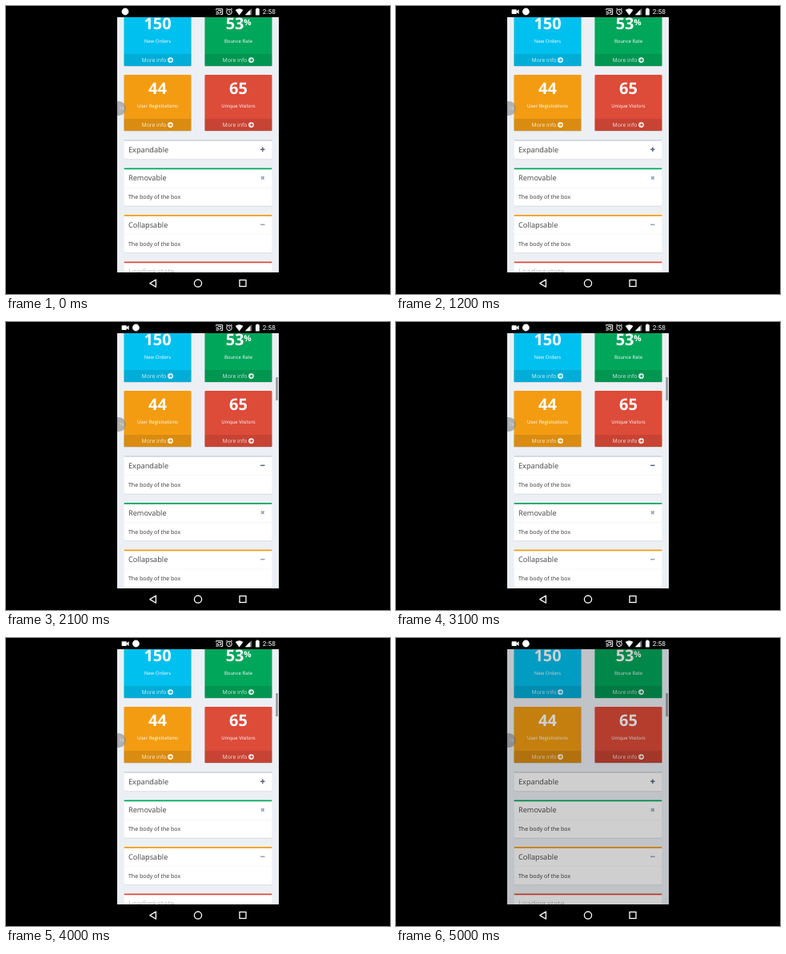
Recreate the animation shown at these times as an HTML page. Size 480 by 360 pixels, loop 5100 ms.

```html
<!DOCTYPE html>
<html lang="en">
<head>
<meta charset="utf-8">
<title>Dashboard boxes</title>
<style>
  html, body { margin: 0; width: 100%; height: 100%; overflow: hidden; background: #000; }
  svg { display: block; width: 480px; height: 360px; }
  text { font-family: "Open Sans", "Noto Sans", sans-serif; text-rendering: geometricPrecision; }
  .mid { text-anchor: middle; }
  .num { font-size: 20px; font-weight: 700; fill: #fff; }
  .sup { font-size: 10.4px; font-weight: 700; fill: #fff; }
  .label { font-size: 6px; fill: #fff; }
  .more { font-size: 6.85px; fill: #fff; fill-opacity: .82; }
  .title { font-size: 9.2px; fill: #444; }
  .body { font-size: 7px; fill: #333; }
  .clock { font: 8.3px Roboto, sans-serif; fill: #fff; }
</style>
</head>
<body>
<svg viewBox="0 0 480 360">
  <defs>
    <clipPath id="screen"><rect x="139" y="14" width="202" height="319"/></clipPath>
    <clipPath id="fold"><rect id="foldRect" x="147" y="167" width="186" height="24"/></clipPath>
  </defs>
  <rect width="480" height="360"/>

  <g clip-path="url(#screen)">
    <rect x="139" y="14" width="202" height="319" fill="#ecf0f5"/>
    <g id="cards"></g>
    <g id="first"></g>
    <g id="rest"></g>
    <rect id="scroll" x="337.4" y="69" width="2.4" height="29" fill="#8d9094"/>
    <circle cx="141" cy="128" r="9" fill="#8b8b8b" fill-opacity=".62"/>
    <text x="141.3" y="130.2" font-size="5.8" fill="#ddd">74</text>
    <rect id="dim" x="139" y="14" width="202" height="319"/>
  </g>

  <g fill="#fff">
    <g id="camera">
      <rect x="144.6" y="4.2" width="6.2" height="5.8" rx=".8"/>
      <path d="M150.6 6.5l3-2.2v5.6l-3-2.2z"/>
    </g>
    <circle id="chat" cy="7" r="4.4"/>
    <g fill="none" stroke="#fff">
      <path d="M262.7 5.2V3.7h8v6.8h-2.6M262.6 10.6h1M262.6 8.7a2 2 0 0 1 2 2M262.6 6.8a3.8 3.8 0 0 1 3.8 3.8"/>
      <path d="M265 5.6h3.8v3h-1.6"/>
      <circle cx="279" cy="7.3" r="3.3"/>
      <path d="M279 5.2v2.3l1.5.9M275.1 4.3l1.9-1.5M282.9 4.3l-1.9-1.5" stroke-width=".9"/>
    </g>
    <path d="M286.7 5.1q4.9-3.9 9.8 0L291.600 11.400z"/>
    <path d="M307.300 2.700v8.500h-8.500z" fill-opacity=".4"/>
    <path d="M305.400 4.600v6.600h-6.600z"/>
    <path d="M312 3.400h1.200v-.9h2.400v.9h1.200v8H312z"/>
    <text class="clock" x="320.800" y="10.200">2:58</text>
  </g>

  <g fill="none" stroke="#fff" stroke-width="1.3">
    <path d="M187.400 342v9.200l-7.600-4.600z" stroke-linejoin="round"/>
    <circle cx="240" cy="346.600" r="4.600"/>
    <rect x="292" y="342.500" width="8" height="8"/>
  </g>
</svg>

<script>
const LOOP = 5100, TOP = 167.1, HEAD = 24.2, BODY = 23.4, GAP = 11.3;
const $ = id => document.getElementById(id);

const rect = (x, y, w, h, fill, extra = "") =>
  `<rect x="${x}" y="${y}" width="${w}" height="${h}" fill="${fill}" ${extra}/>`;
const text = (cls, x, y, s, extra = "") =>
  `<text class="${cls}" x="${x}" y="${y}" ${extra}>${s}</text>`;

function card(x, y, color, num, label, sup) {
  const mid = x + 42, cy = y + 62.6;
  return rect(x, y + 1, 84, 69.9, "#000", 'rx="1" fill-opacity=".1"') +
    rect(x, y, 84, 70, color, 'rx="1"') +
    rect(x, y + 55, 84, 15, "#000", 'fill-opacity=".1"') +
    (sup ? text("num", x + 26.2, y + 24.3, num) + text("sup", x + 48.8, y + 18.6, sup)
         : text("num mid", mid, y + 24.3, num)) +
    text("label mid", mid, y + 41.2, label) +
    text("more", x + 22, y + 65.1, "More info") +
    `<circle cx="${x + 58}" cy="${cy}" r="3.4" fill="#fff" fill-opacity=".95"/>
     <path d="M${x + 56} ${cy}h3.6m-1.7-1.8l1.8 1.8l-1.8 1.8" fill="none" stroke="${color}" stroke-width="1.1"/>`;
}

const frame = (y, h, color) =>
  rect(147.5, y + 1, 185, h, "#000", 'rx="1.5" fill-opacity=".08"') +
  rect(147.5, y, 185, h, "#fff", 'rx="1.5"') +
  rect(147.5, y, 185, 1.7, color, 'rx=".8"');

const divider = y => rect(147.5, y, 185, .6, "#f1f1f1");

function icon(kind, y, color) {
  const shape = { plus: "M-2.7 0H2.7M0-2.7V2.7", minus: "M-2.7 0H2.7", cross: "M-1.8-1.8L1.8 1.8M-1.8 1.8L1.8-1.8" };
  return `<path d="${shape[kind]}" transform="translate(320.8 ${y})" stroke="${color}" stroke-width="1.5"/>`;
}

function box(y, color, title, kind) {
  return frame(y, HEAD + BODY - .4, color) + divider(y + HEAD) +
    text("title", 153, y + 15.6, title) + icon(kind, y + 12.2, "#97a0b3") +
    text("body", 153, y + 38.6, "The body of the box");
}

$("cards").innerHTML =
  card(147.5, 5, "#00c0ef", "150", "New Orders") +
  card(248.5, 5, "#00a65a", "53", "Bounce Rate", "%") +
  card(147.5, 86, "#f39c12", "44", "User Registrations") +
  card(248.5, 86, "#dd4b39", "65", "Unique Visitors");

const second = TOP + HEAD + GAP, pitch = 58.5;
$("rest").innerHTML =
  box(second, "#00a65a", "Removable", "cross") +
  box(second + pitch, "#f39c12", "Collapsable", "minus") +
  frame(second + 2 * pitch, 47, "#dd4b39") +
  text("title", 153, second + 2 * pitch + 15.6, "Loading state", 'fill-opacity=".36"');

// [start ms, value]: each value holds until the next start
const slide = [[0, 0], [1800, .345], [1900, .655], [2000, .905], [2100, 1],
  [3400, .99], [3700, .39], [3900, .01], [4000, 0]];
const shade = [[0, 0], [4900, .03], [5000, .19]];
const at = (steps, t) => steps.filter(s => s[0] <= t).pop()[1];

function drawFirst(open, kind) {
  const h = HEAD + BODY * open;
  $("foldRect").setAttribute("y", TOP);
  $("foldRect").setAttribute("height", h);
  $("first").innerHTML = frame(TOP, h, "#d2d6de") +
    text("title", 153, TOP + 15.6, "Expandable") + icon(kind, TOP + 12.2, "#59657e") +
    (open ? divider(TOP + HEAD) +
      `<g clip-path="url(#fold)">${text("body", 153, TOP + 38.6 - 6 * (1 - open), "The body of the box")}</g>` : "");
  $("rest").setAttribute("transform", `translate(0 ${BODY * open})`);
}

let last = -1;
function draw() {
  const t = Math.floor(performance.now() % LOOP / 100) * 100;
  if (t !== last) {
    last = t;
    drawFirst(at(slide, t), t >= 1500 && t < 3400 ? "minus" : "plus");
    $("scroll").setAttribute("opacity", t >= 1500 ? 1 : 0);
    $("dim").setAttribute("opacity", at(shade, t));
    $("camera").setAttribute("opacity", Math.min(1, t / 500));
    $("chat").setAttribute("cx", t < 100 ? 149 : 162.4);
  }
  requestAnimationFrame(draw);
}
draw();
</script>
</body>
</html>
```
